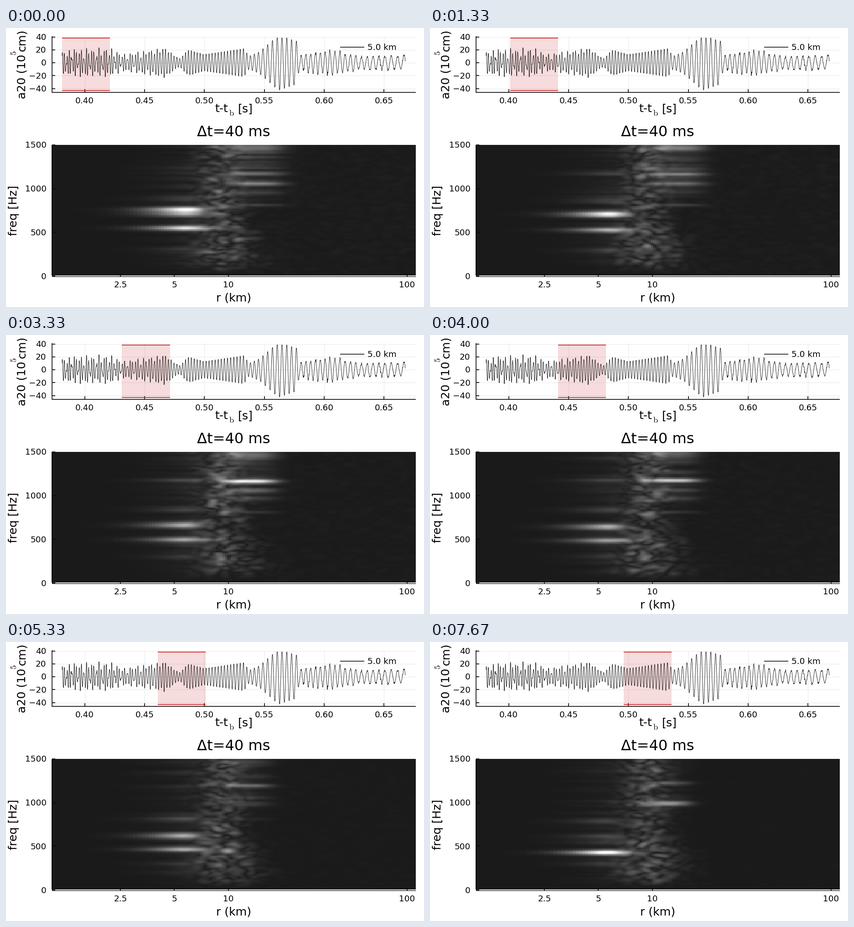
Recreate the animation shown at these times as a matplotlib script. Size 917 px wide and 611 px high, loop 8 s.

```python
import numpy as np
import matplotlib.pyplot as plt
from matplotlib.animation import FuncAnimation
from matplotlib.colors import LinearSegmentedColormap
from matplotlib.patches import Rectangle

W, H, DPI = 917, 611, 100
LOOP_MS, FRAMES, STEPS = 8000, 160, 24   # the window moves STEPS times per loop
PX = 72 / DPI                            # points per pixel
TICK, LABEL, TITLE = 18.4, 25.3, 32.2
LEFT, RIGHT = 100.5, 898.5
RED, GRID = "#c81919", "#ebebeb"

plt.rcParams["font.family"] = "DejaVu Sans"
rng = np.random.default_rng(7)

fig = plt.figure(figsize=(W / DPI, H / DPI), dpi=DPI, facecolor="white")
ax = fig.add_axes([0, 0, 1, 1])
ax.set_xlim(0, W)
ax.set_ylim(H, 0)
ax.axis("off")


def time_x(t):
    return 172.5 + (t - 0.40) * 2628


def amp_y(a):
    return 76 - 1.4125 * a


def radius_x(r):
    return 487.5 + 392.5 * (np.log10(r) - 1)


def freq_y(f):
    return 543 - f * 287 / 1500


def line(x, y, color="black", width=1.6, z=4):
    return ax.plot(x, y, color=color, lw=width * PX, zorder=z,
                   solid_capstyle="butt", solid_joinstyle="round")[0]


def text(x, y, s, size, ha="center", **kw):
    ax.text(x, y, s, fontsize=size * PX, ha=ha, va="baseline", zorder=6, **kw)


def smooth(a, width, axis):
    k = np.exp(-(np.arange(-3 * width, 3 * width + 1) / width) ** 2)
    return np.apply_along_axis(np.convolve, axis, a, k / k.sum(), "same")


def pulse(x, centre, width):
    return np.exp(-((x - centre) / width) ** 2)


def rise(x, centre, width):
    return 1 / (1 + np.exp((centre - x) / width))


# ---- upper panel: waveform ------------------------------------------------
def waveform():
    """A chirp falling in pitch, with a second mode that dies out early."""
    x = np.arange(123, 876.5, 0.4)
    period = np.interp(x, [123, 430, 520, 570, 700, 876], [5.2, 6.5, 7.1, 10.5, 10.5, 14.5])
    phase = np.cumsum(2 * np.pi * 0.4 / period)
    phase -= np.interp(595, x, phase)
    second = 0.65 * rise(-x, -310, 30)
    wave = (np.cos(phase) + second * np.cos(1.41 * phase + 1)) / (1 + 0.5 * second)
    envelope = np.interp(x, [123, 220, 262, 349, 380, 400, 435, 522, 533, 556, 598, 639, 643, 716, 780, 876],
                         [15, 18, 11, 22, 6, 20, 13, 22, 10, 17, 43, 33, 11, 19, 9, 11])
    rough = 4 * rise(-x, -240, 35) + 2.2 * rise(x, 642, 2)
    y = envelope * wave + rough * smooth(rng.normal(size=x.size), 1, 0)
    return x, np.clip(y, -43.5, 38.5)


for a in range(-40, 41, 20):
    line([LEFT, RIGHT], [amp_y(a)] * 2, GRID, 1.1, 1)
    line([LEFT, LEFT + 7], [amp_y(a)] * 2)
    text(88.5, amp_y(a) + 6.5, f"{a}".replace("-", "\u2212"), TICK, "right")
for t in np.arange(0.40, 0.66, 0.05):
    line([time_x(t)] * 2, [18, 141], GRID, 1.1, 1)
    line([time_x(t)] * 2, [134, 141])
    text(time_x(t), 165, f"{t:.2f}", TICK)
line([LEFT, LEFT, RIGHT], [18, 141, 141])

wave_x, wave_a = waveform()
line(wave_x, amp_y(wave_a), width=0.8, z=3)
line([733, 785.5], [42, 42], width=1.5)
text(793, 48.5, "5.0 km", TICK, "left")

text(458, 184.5, "t-t", LABEL, "left")
text(489, 192, r"$\mathrm{b}$", TICK, "left", math_fontfamily="cm")
text(508.5, 184.5, "[s]", LABEL, "left")
up = dict(rotation=90, rotation_mode="anchor")
text(42.5, 155, "a20 (10", LABEL, "left", **up)
text(23, 60, "$5$", TICK, "left", math_fontfamily="cm", **up)
text(42.5, 51, "cm)", LABEL, "left", **up)

# ---- sliding window -------------------------------------------------------
TOP, BOTTOM = amp_y(38.5), amp_y(-43.5)
SPAN = 0.040 * 2628
window = ax.add_patch(Rectangle((0, TOP), SPAN, BOTTOM - TOP,
                                fc=RED, ec="none", alpha=0.15, zorder=2))
edges = [line([0, SPAN], [y, y], RED) for y in (TOP, BOTTOM)]

# ---- lower panel: spectrogram ---------------------------------------------
DF = 12.5
r_edges = [1.03]
while r_edges[-1] < 111.5:
    r_edges.append(r_edges[-1] + max(0.16, 0.025 * r_edges[-1]))
x_edges = np.clip(radius_x(np.array(r_edges)), 100, RIGHT)
f_edges = np.clip(np.arange(-DF / 2, 1500 + DF, DF), 0, 1500)
freqs = np.arange(0, 1500 + DF / 2, DF)[:, None]
xs = ((x_edges[1:] + x_edges[:-1]) / 2)[None, :]

FIELDS = 9


def noise_fields(columns):
    """Complex noise with unit power, correlated over neighbouring cells."""
    fields = []
    for _ in range(FIELDS):
        z = rng.normal(size=(freqs.size, columns)) + 1j * rng.normal(size=(freqs.size, columns))
        z = smooth(z, 2, 0)
        if columns > 1:
            z = smooth(z, 3, 1)
        fields.append(z / np.sqrt(np.mean(np.abs(z) ** 2)))
    return fields


speckle, stripes = noise_fields(xs.size), noise_fields(1)


def drift(fields, i):
    """Blend neighbouring noise fields so that the texture changes step by step."""
    w = pulse(i / 3, np.arange(FIELDS), 0.7)
    return np.abs(sum(a * f for a, f in zip(w, fields))) / np.sqrt(np.sum(w ** 2))


def lobe(centre, left, right, p_left, p_right):
    d = xs - centre
    return np.exp(-np.where(d < 0, (np.abs(d) / left) ** p_left,
                            (np.abs(d) / right) ** p_right))


def spectrum(i):
    def band(freq, width, strength):
        return strength * pulse(freqs, freq, width)

    inner = lobe(391 - 0.35 * i, 72, 44, 1.4, 2.5)
    inner_wide = lobe(391 - 0.35 * i, 72, 56, 1.4, 2.2)
    outer = lobe(552 - i, 66, 58 - 0.6 * i, 3, 2.6)
    rows = drift(stripes, i)
    cut_in = 1 - pulse(freqs, 0, 110)
    fading = rise(-i, -14, 3)

    low_mode = band(548 - 5.2 * i, 29, 0.58 + 0.4 * ((i - 11) / 12) ** 4)
    high_mode = (band(715 - 105 * rise(i, 10, 2.5), 36,
                      (0.62 + 0.33 * pulse(i, 4, 2)) * rise(-i, -22.3, 0.7))
                 + band(765, 28, 0.9 * pulse(i, 0, 2)))
    faint_modes = (band(880 - 4 * i, 35, 0.14) + band(300, 30, 0.09)
                   + band(1175, 25, 0.18 * pulse(i, 9, 6)))
    outer_modes = (band(1055, 24, 0.42 * np.exp(-i / 9))
                   + band(1165 + 4.5 * max(i - 10, 0), 24, 0.2 + 0.63 * pulse(i, 9.5, 5))
                   + band(1470, 55, 0.28 * fading)
                   + band(950 + 1.8 * i, 28, 0.1 + 0.36 * pulse(i, 23, 2.5))
                   + band(810, 18, 0.14 * fading))
    haze = (0.02 + 0.1 * fading) * rows[::-1] * rise(freqs, 980, 60)

    total = inner_wide * (low_mode + 0.035 * rows * cut_in)
    total += inner * (high_mode + faint_modes)
    total += outer * (outer_modes + haze)

    low = rise(-freqs, -520, 60)
    cloud = pulse(xs, 472 + 10 * low, 48 + 20 * low) * cut_in
    tail = (0.002 + 0.008 * fading) * rise(xs, 560, 10)
    total += (0.17 * cloud + tail) * drift(speckle, i)
    return np.clip(total, 0, 1)


spectra = [spectrum(i) for i in range(STEPS)]
grays = LinearSegmentedColormap.from_list("dim", ["#1a1a1a", "white"])
mesh = ax.pcolormesh(x_edges, np.minimum(freq_y(f_edges), 542), spectra[0],
                     cmap=grays, vmin=0, vmax=1, zorder=2)
line([LEFT, LEFT, RIGHT], [256, 543.5, 543.5], width=1.2)

for f in range(0, 1501, 500):
    line([LEFT, LEFT + 7], [freq_y(f)] * 2)
    text(88.5, freq_y(f) + 6.5, f"{f}", TICK, "right")
for r in (2.5, 5, 10, 100):
    line([radius_x(r)] * 2, [539, 543.5])
    text(radius_x(r), 568, f"{r:g}", TICK)

text(499.5, 237, "\u0394t=40 ms", TITLE)
text(499.5, 598.5, "r (km)", LABEL)
text(24, 399.5, "freq [Hz]", LABEL, **up)


def update(frame):
    # The step that begins within this frame is already shown.
    step = (STEPS * (frame + 1) - 1) // FRAMES
    x = time_x(0.3812 + 0.005 * step)
    window.set_x(x)
    for edge in edges:
        edge.set_xdata([x, x + SPAN])
    mesh.set_array(spectra[step])
    return [window, mesh, *edges]


anim = FuncAnimation(fig, update, frames=FRAMES, interval=LOOP_MS / FRAMES,
                     repeat=True, repeat_delay=0)
plt.show()
```
